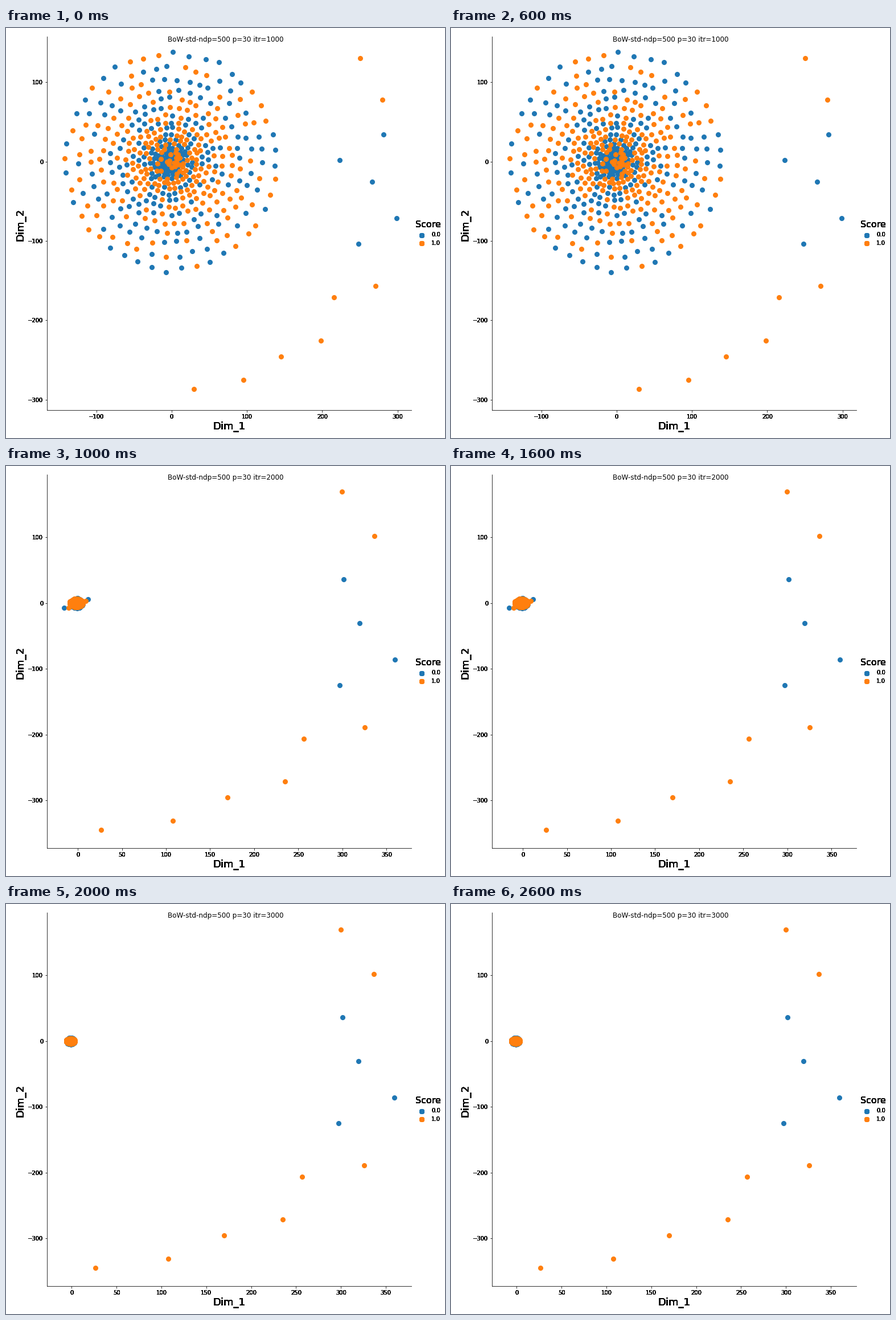
These frames come from a looping animation (771 px wide and 720 px high, 3 s). A matplotlib script:

```python
import numpy as np
import matplotlib.pyplot as plt
from matplotlib.animation import FuncAnimation

W, H, DPI = 771, 720, 72
LEFT, RIGHT, TOP, BOTTOM = 72.2, 712.2, 14.8, 670.8
BLUE, ORANGE = "#1f77b4", "#ff7f0e"

plt.rcParams["font.family"] = "DejaVu Sans"


class View:
    """Axis origin and scale in pixels, with the x tick values."""

    def __init__(self, x0, sx, y0, sy, x_ticks):
        self.x0, self.sx, self.y0, self.sy = x0, sx, y0, sy
        self.x_ticks, self.y_ticks = x_ticks, range(-300, 101, 100)

    def x(self, v):
        return self.x0 + self.sx * np.asarray(v)

    def y(self, v):
        return self.y0 - self.sy * np.asarray(v)

    def place(self, points):
        px, py = np.array(points).T
        return np.column_stack([self.x(px), self.y(py)])


VIEWS = [View(290.9, 1.3227, 234.7, 1.393, range(-100, 301, 100)),
         View(126.2, 1.5486, 240.6, 1.155, range(0, 351, 50)),
         View(115.2, 1.577, 240.6, 1.155, range(0, 351, 50))]

# Settled places of the outlying dots, in data units
FAR_BLUE = [(319.7, -30.8), (359.7, -86.1), (297.1, -125.1)]
FAR_ORANGE = [(299.6, 169.3), (336.5, 101.8), (325.5, -189.2),
              (256.4, -206.5), (235.1, -271.5), (169.9, -295.7),
              (107.9, -331.2), (26.5, -345.1)]
EARLY_STRAYS = [(281.5, 34.1), (223.2, 1.8)]
LATE_STRAY = [(301.6, 35.9)]


def unsettle(points):
    """Earlier, tighter arrangement of the outlying dots."""
    x, y = np.array(points).T
    return np.column_stack([0.808 * x + 8, 0.83 * y - 0.06 * np.maximum(y, 0)])


def ellipse(center, rx, ry, r, angle):
    return np.column_stack([center[0] + rx * r * np.cos(angle),
                            center[1] + ry * r * np.sin(angle)])


def ring_cloud(center, rx, ry):
    """Jittered rings whose spacing shrinks toward the centre."""
    rng = np.random.default_rng(30)
    rings, radius = [], ry
    while radius > 2:
        gap = 4.5 + 0.118 * radius
        n = round(2 * np.pi * radius / gap)
        angle = (np.arange(n) + rng.random()) / n * 2 * np.pi
        angle += rng.normal(0, 0.09 * gap / radius, n)
        r = radius + rng.normal(0, 0.09 * gap, n)
        rings.append(ellipse(center, rx / ry, 1, r, angle))
        radius -= 0.87 * gap
    dots = np.vstack(rings)
    is_blue = rng.random(len(dots)) < 0.5
    return dots[is_blue], dots[~is_blue]


def clump(center, rx, ry, n=240):
    """Dots filling a small ellipse."""
    rng = np.random.default_rng(7)
    return ellipse(center, rx, ry, np.sqrt(rng.random(n)),
                   rng.random(n) * 2 * np.pi)


def scenes():
    """Blue and orange dot positions of each view, in pixels."""
    first, second, third = VIEWS
    late_blue = FAR_BLUE + LATE_STRAY
    cloud_blue, cloud_orange = ring_cloud((289, 234), 184, 189)
    yield (np.vstack([cloud_blue, first.place(unsettle(FAR_BLUE)),
                      first.place(EARLY_STRAYS)]),
           np.vstack([cloud_orange, first.place(unsettle(FAR_ORANGE))]))
    yield (np.vstack([clump((124, 241), 11, 8.8), [(101.5, 248.5), (143.5, 233.5)],
                      second.place(late_blue)]),
           np.vstack([clump((123.5, 240.5), 12, 7.5), [(109.5, 248.5), (140, 236.5)],
                      second.place(FAR_ORANGE)]))
    yield (np.vstack([clump((113.2, 240.7), 7.5, 6), third.place(late_blue)]),
           np.vstack([clump((113.5, 240.7), 8, 5), third.place(FAR_ORANGE)]))


SCENES = list(scenes())

fig = plt.figure(figsize=(W / DPI, H / DPI), dpi=DPI, facecolor="white")
ax = fig.add_axes([LEFT / W, 1 - BOTTOM / H,
                   (RIGHT - LEFT) / W, (BOTTOM - TOP) / H])
ax.set(xlim=(LEFT, RIGHT), ylim=(BOTTOM, TOP))
ax.spines[["top", "right"]].set_visible(False)
title = fig.suptitle("", fontsize=12)


def dots(color, x=(), y=()):
    return ax.scatter(x, y, s=64, c=color, linewidths=1, edgecolors=color,
                      clip_on=False)


def heavy(x, y, s, **style):
    """Text painted several times over, which hardens its edges."""
    return [ax.text(x, y, s, **style) for _ in range(8)]


layers = dots(BLUE), dots(ORANGE)

heavy(392, 705, "Dim_1", size=18, ha="center")
heavy(30, 345, "Dim_2", size=18, ha="center", va="baseline",
      rotation=90, rotation_mode="anchor")
heavy(741, 350, "Score", size=16, ha="center")
for label, color, y in [("0.0", BLUE, 363.5), ("1.0", ORANGE, 378)]:
    heavy(747, y + 3, label, size=10)
    dots(color, [729.5] * 16, [y] * 16)

tick_texts = []


def tick_label(value):
    return str(value).replace("-", "\u2212")


def draw_ticks(view):
    while tick_texts:
        tick_texts.pop().remove()
    xs, ys = view.x(view.x_ticks), view.y(view.y_ticks)
    ax.set_xticks(xs, [""] * len(xs))
    ax.set_yticks(ys, [""] * len(ys))
    for x, v in zip(xs, view.x_ticks):
        tick_texts.extend(heavy(x, BOTTOM + 7, tick_label(v), size=10,
                                ha="center", va="top"))
    for y, v in zip(ys, view.y_ticks):
        tick_texts.extend(heavy(LEFT - 7, y, tick_label(v), size=10,
                                ha="right", va="center_baseline"))


def update(i):
    title.set_text(f"BoW-std-ndp=500 p=30 itr={(i + 1) * 1000}")
    draw_ticks(VIEWS[i])
    for layer, points in zip(layers, SCENES[i]):
        layer.set_offsets(points)
    return []


anim = FuncAnimation(fig, update, frames=3, interval=1000, repeat=True,
                     repeat_delay=0, init_func=lambda: update(0))
plt.show()
```
